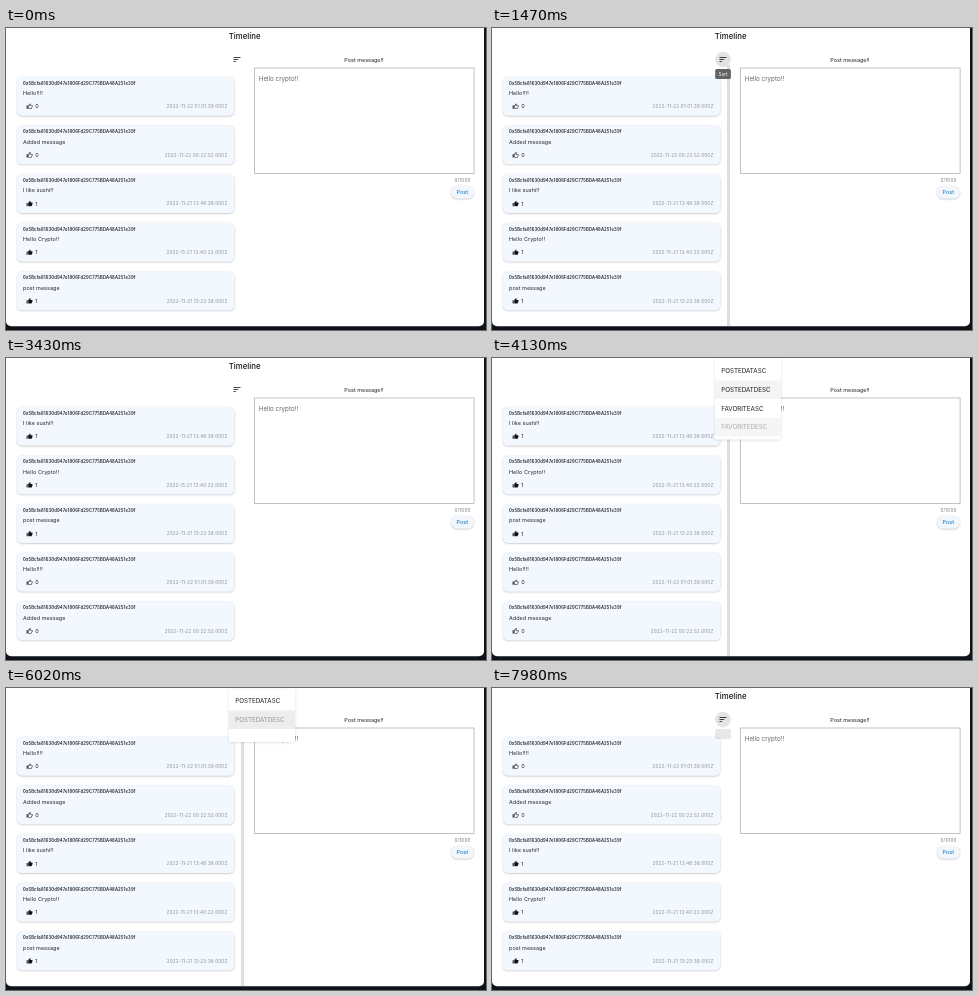
Write an HTML page with a canvas that moves like this. It is 480 by 302 pixels and loops after 8000 ms.

```html
<!DOCTYPE html>
<html lang="en">
<head>
<meta charset="utf-8">
<title>Timeline</title>
<style>
  html, body { margin: 0; width: 100%; height: 100%; overflow: hidden; background: #0e131a; }
  canvas { display: block; width: 480px; height: 302px; }
</style>
</head>
<body>
<canvas id="stage"></canvas>
<script>
const W = 480, H = 302, LOOP = 8000, STEP = 70;
const canvas = document.getElementById('stage');
const ctx = canvas.getContext('2d');
const scale = Math.max(1, window.devicePixelRatio || 1);
canvas.width = W * scale;
canvas.height = H * scale;

const ADDRESS = '0x5Bcfa81630d947e1806Fd29C775BDA48A251e39f';
const POSTS = [
  { text: 'Hello!!!!', likes: 0, date: '2022-11-22 01:01:39.000Z' },
  { text: 'Added message', likes: 0, date: '2022-11-22 00:22:52.000Z' },
  { text: 'I like sushi!!', likes: 1, date: '2022-11-21 13:48:38.000Z' },
  { text: 'Hello Crypto!!', likes: 1, date: '2022-11-21 13:40:22.000Z' },
  { text: 'post message', likes: 1, date: '2022-11-21 13:23:38.000Z' }
];
const BY_DATE = [0, 1, 2, 3, 4];
const BY_LIKES = [2, 3, 4, 0, 1];

const OPTIONS = ['POSTEDATASC', 'POSTEDATDESC', 'FAVORITEASC', 'FAVORITEDESC'];
const MENU = { x: 223, y: 0.5, w: 66, h: 81, pad: 3.1, row: 18.7 };
// Each opening of the menu; focus is the option currently in use.
const OPENINGS = [
  { open: 1740, press: 2590, close: 2710, focus: 1, pick: 3, move: 2380 },
  { open: 3885, press: 4890, close: 4950, focus: 3, pick: 1, move: 0 },
  { open: 5876, press: 6930, close: 7120, focus: 1, pick: 1, move: 0 }
];

const thumbBody = 'M1 21h4V9H1v12z';
const thumbFull = new Path2D(thumbBody + 'm22-11c0-1.1-.9-2-2-2h-6.31l.95-4.57.03-.32c0-.41-.17-.79-.44-1.06L14.17 1 7.59 7.59C7.22 7.95 7 8.45 7 9v10c0 1.1.9 2 2 2h9c.83 0 1.54-.5 1.84-1.22l3.02-7.05c.09-.23.14-.47.14-.73v-2z');
const thumbLine = new Path2D(thumbBody + 'M9 21h9c.83 0 1.54-.5 1.84-1.22l3.02-7.05c.09-.23.14-.47.14-.73v-2c0-1.1-.9-2-2-2h-6.31l.95-4.57.03-.32c0-.41-.17-.79-.44-1.06L14.17 1 7.58 7.59C7.22 7.95 7 8.45 7 9v10c0 1.1.9 2 2 2zM9 9l4.34-4.34L12 10h9v2l-3 7H9V9z');
const sortLines = new Path2D('M3 18h6v-2H3v2zM3 6v2h18V6H3zm0 7h12v-2H3v2z');

const clamp = v => Math.min(1, Math.max(0, v));
const ramp = (t, a, b) => clamp((t - a) / (b - a));
const black = a => `rgba(0,0,0,${a})`;

function box(x, y, w, h, r, fill) {
  ctx.beginPath();
  ctx.roundRect(x, y, w, h, r);
  ctx.fillStyle = fill;
  ctx.fill();
}

function disc(x, y, r, fill) {
  ctx.beginPath();
  ctx.arc(x, y, r, 0, Math.PI * 2);
  ctx.fillStyle = fill;
  ctx.fill();
}

function shadowed(color, blur, dy, draw) {
  ctx.save();
  ctx.shadowColor = color;
  ctx.shadowBlur = blur * scale;
  ctx.shadowOffsetY = dy * scale;
  draw();
  ctx.restore();
}

// y is the middle of the capital letters.
function label(str, x, y, size, color, { weight = 400, align = 'left', gap = 0 } = {}) {
  ctx.font = `${weight} ${size}px Inter, Roboto, sans-serif`;
  ctx.letterSpacing = gap + 'px';
  ctx.textAlign = align;
  ctx.textBaseline = 'alphabetic';
  ctx.fillStyle = color;
  ctx.fillText(str, x, y + size * 0.36);
}

function icon(path, x, y, k, color) {
  ctx.save();
  ctx.translate(x - 12 * k, y - 12 * k);
  ctx.scale(k, k);
  ctx.fillStyle = color;
  ctx.fill(path);
  ctx.restore();
}

function drawCard(post, i) {
  const y = 48.8 + i * 48.65;
  shadowed(black(0.24), 1.8, 0.6, () => box(11, y, 217.3, 39, 5, '#f3f8fe'));
  label(ADDRESS, 17, y + 6.4, 4.2, '#20242a', { weight: 600, gap: 0.15 });
  label(post.text, 17, y + 16.4, 5.46, '#23262a', { gap: 0.05 });
  icon(post.likes ? thumbFull : thumbLine, 23.6, y + 29.6, 0.27, '#111');
  label(post.likes, 29.3, y + 29.7, 5.46, '#23262a');
  label(post.date, 221.5, y + 29.6, 4.68, '#8b9097', { align: 'right', gap: 0.15 });
}

function drawForm() {
  label('Post message!!', 358, 32.2, 5.46, '#222', { align: 'center' });
  ctx.strokeStyle = '#b4b4b4';
  ctx.lineWidth = 0.8;
  ctx.strokeRect(248.5, 40, 219.6, 105.5);
  label('Hello crypto!!', 252.8, 50.4, 6.24, '#666');
  label('0/1000', 464.6, 151.9, 4.68, '#777', { align: 'right', gap: 0.15 });
  shadowed(black(0.28), 1.6, 0.5, () => box(445, 158, 23, 12.8, 6.4, '#f1f7fd'));
  label('Post', 456.3, 164.3, 5.46, '#1c86cc', { weight: 500, align: 'center' });
}

function barAlpha(t) {
  return 0.8 * ramp(t, 490, 700) + 0.2 * ramp(t, 1260, 1470) - ramp(t, 2030, 2310)
    + ramp(t, 3710, 3920) - ramp(t, 4410, 4550)
    + ramp(t, 5460, 5670) - ramp(t, 6230, 6510);
}

function pulse(t, start, end, rise) {
  return t < end ? ramp(t, start, start + rise) : 0;
}

function drawSort(t) {
  const hover = pulse(t, 1260, 2040, 210) + pulse(t, 3640, 4180, 210)
    + pulse(t, 5460, 6180, 210) + pulse(t, 7260, LOOP, 150);
  const tip = pulse(t, 1260, 2040, 210) + pulse(t, 3710, 4180, 180)
    + pulse(t, 5460, 6180, 210) + pulse(t, 7957, LOOP, 150);
  if (hover) disc(231, 31.6, 7.8, black(0.11 * hover));
  icon(sortLines, 231, 31.6, 0.39, '#111');
  if (tip) {
    ctx.save();
    ctx.globalAlpha = tip;
    box(223.2, 40.9, 15.7, 10, 1.5, '#636363');
    label('Sort', 231, 46, 4.7, '#fff', { align: 'center' });
    ctx.restore();
  }
}

function drawOption(i, m, t, alpha) {
  const y = MENU.y + MENU.pad + i * MENU.row;
  const hovered = i === (t >= m.move ? m.pick : m.focus);
  ctx.save();
  ctx.globalAlpha *= alpha;
  ctx.beginPath();
  ctx.rect(MENU.x, y, MENU.w, MENU.row);
  ctx.clip();
  const tint = (i === m.focus ? 0.12 : 0) + (hovered ? 0.045 : 0);
  if (tint) box(MENU.x, y, MENU.w, MENU.row, 0, black(tint));
  if (i === m.pick && t >= m.press) {
    const age = t - m.press;
    box(MENU.x, y, MENU.w, MENU.row, 0, black(0.045));
    disc(240, y + MENU.row / 2, 4 + age * 0.08, black(0.05 * (1 - ramp(age, 100, 350))));
  }
  label(OPTIONS[i], MENU.x + 6.3, y + MENU.row / 2, 6.24, '#1c1c1c');
  ctx.restore();
}

function drawMenu(m, t) {
  const v = t < m.close
    ? ramp(t, m.open, m.open + 300)
    : Math.min(1, 1.5 * (1 - ramp(t, m.close, m.close + 300)));
  if (v <= 0) return;
  const unit = 1 / (OPTIONS.length + 1.5);
  const w = MENU.w * clamp(v / unit);
  const h = MENU.h * clamp(v / (unit * OPTIONS.length));
  ctx.save();
  ctx.globalAlpha = clamp(v * 3);
  shadowed(black(0.13), 3, 0.8, () => box(MENU.x, MENU.y, w, h, 1.5, '#fff'));
  ctx.beginPath();
  ctx.rect(MENU.x, MENU.y, w, h);
  ctx.clip();
  OPTIONS.forEach((_, i) => {
    const start = (i + 1) * unit;
    const alpha = ramp(v, start, Math.min(1, start + 1.5 * unit));
    if (alpha) drawOption(i, m, t, alpha);
  });
  ctx.restore();
}

function draw(t) {
  ctx.setTransform(scale, 0, 0, scale, 0, 0);
  ctx.fillStyle = '#0e131a';
  ctx.fillRect(0, 0, W, H);
  box(0, 0, 478, 298.2, [0, 0, 5, 5], '#fff');

  label('Timeline', 238.6, 8, 7.8, '#111', { weight: 500, align: 'center' });
  const order = t >= 2800 && t < 5110 ? BY_LIKES : BY_DATE;
  order.forEach((id, i) => drawCard(POSTS[id], i));
  const bar = clamp(barAlpha(t));
  if (bar) box(235, 37, 3, 261, 0, black(0.13 * bar));
  drawForm();
  drawSort(t);
  OPENINGS.forEach(m => {
    if (t >= m.open && t < m.close + 300) drawMenu(m, t);
  });
}

const begin = performance.now();
function tick() {
  const t = (performance.now() - begin) % LOOP;
  draw(Math.floor(t / STEP) * STEP);
  requestAnimationFrame(tick);
}
tick();
</script>
</body>
</html>
```
